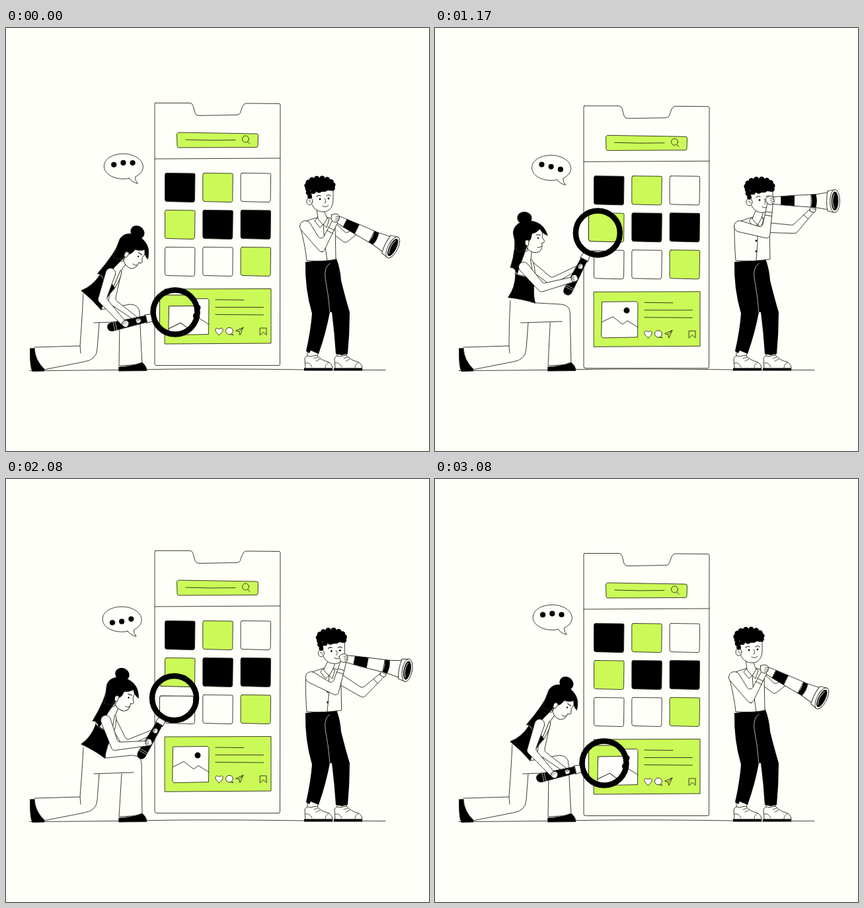
Animation, 640 px wide and 640 px high, one loop 3.16 s. Source, as an HTML page with a canvas:

```html
<!DOCTYPE html>
<html lang="en">
<head>
<meta charset="utf-8">
<title>Searching together</title>
<style>
html, body { margin: 0; width: 100%; height: 100%; overflow: hidden; background: #fffffa; }
canvas { display: block; width: 640px; height: 640px; }
</style>
</head>
<body>
<canvas id="stage" width="640" height="640"></canvas>
<script>
const ctx = document.getElementById('stage').getContext('2d');
const LOOP = 3160, FRAMES = 38, TAU = Math.PI * 2;
const PAPER = '#fffffa', INK = '#29291b', LIME = '#cbfa58', BLACK = '#000';

// ---------- helpers ----------
function paint(d, fill, line = INK, width = .9) {
  const p = new Path2D(d);
  if (fill) { ctx.fillStyle = fill; ctx.fill(p); }
  if (line) { ctx.strokeStyle = line; ctx.lineWidth = width; ctx.stroke(p); }
}

function oval(x, y, rx, ry, fill, line = INK, width = .9) {
  ctx.beginPath();
  ctx.ellipse(x, y, rx, ry, 0, 0, TAU);
  if (fill) { ctx.fillStyle = fill; ctx.fill(); }
  if (line) { ctx.strokeStyle = line; ctx.lineWidth = width; ctx.stroke(); }
}

const dot = (x, y, r) => oval(x, y, r, r, BLACK, null);
const rad = deg => deg * Math.PI / 180;
const mix = (a, b, k) => a + (b - a) * k;
const shift = (p, n, k) => [p[0] + n[0] * k, p[1] + n[1] * k];

function placed(x, y, angle, draw) {
  ctx.save();
  ctx.translate(x, y);
  ctx.rotate(angle);
  draw();
  ctx.restore();
}

// Point at local (x, y) of a frame with the given origin and angle.
function local(o, angle, x, y) {
  const c = Math.cos(angle), s = Math.sin(angle);
  return [o[0] + x * c - y * s, o[1] + x * s + y * c];
}

function normal(a, b) {
  const dx = b[0] - a[0], dy = b[1] - a[1], l = Math.hypot(dx, dy) || 1;
  return [-dy / l, dx / l];
}

// Elbow of an arm from a to c, hanging below the line between them.
function elbow(a, c, upper, fore) {
  const dx = c[0] - a[0], dy = c[1] - a[1];
  const d = Math.min(Math.hypot(dx, dy), upper + fore - 1);
  const cos = (upper * upper + d * d - fore * fore) / (2 * upper * d);
  const turn = Math.atan2(dy, dx) + Math.acos(Math.max(-1, Math.min(1, cos)));
  return local(a, turn, upper, 0);
}

// Tapered arm with a round shoulder; w is the half width at the shoulder.
function arm(a, c, upper, fore, w, cuffs = []) {
  const b = elbow(a, c, upper, fore);
  const n = normal(a, b), m = normal(b, c);
  const l = Math.max(1.1, Math.hypot(n[0] + m[0], n[1] + m[1]));
  const k = [(n[0] + m[0]) / l, (n[1] + m[1]) / l];
  const bend = w * .8 * Math.min(1.5, 2 / l), turn = Math.atan2(n[1], n[0]);
  const side = s => [shift(a, n, w * s), shift(b, k, bend * s), shift(c, m, w * s / 2)];
  const p = side(1), q = side(-1);
  ctx.beginPath();
  ctx.arc(...a, w, turn + Math.PI, turn, true);
  ctx.arcTo(...p[1], ...p[2], 5);
  ctx.lineTo(...p[2]);
  ctx.lineTo(...q[2]);
  ctx.arcTo(...q[1], ...q[0], 5);
  ctx.lineTo(...q[0]);
  ctx.fillStyle = PAPER;
  ctx.fill();
  ctx.strokeStyle = INK;
  ctx.lineWidth = .9;
  ctx.stroke();
  for (const t of cuffs) {
    const at = [mix(b[0], c[0], t), mix(b[1], c[1], t)], half = w * mix(.8, .5, t);
    paint(`M${shift(at, m, half)}L${shift(at, m, -half)}`);
  }
}

function fist(x, y, angle, r) {
  placed(x, y, angle, () => {
    ctx.scale(r, r);
    paint('M-1 -.6Q-.4 -1.2 .5 -1Q1.2 -.7 1 0Q1 .9 0 1Q-1 1 -1 -.6Z', PAPER, INK, .9 / r);
    for (const y of [-.45, 0, .45]) paint(`M.1 ${y}L.95 ${y}`, null, INK, .7 / r);
  });
}

// Keyed poses, eased between neighbours; the last one returns to the first.
function pose(keys, t) {
  let i = keys.length - 1;
  while (i > 0 && t < keys[i].at) i--;
  const a = keys[i], b = keys[i + 1] || { ...keys[0], at: LOOP };
  const u = (t - a.at) / (b.at - a.at), k = u * u * (3 - 2 * u);
  return Object.fromEntries(Object.keys(a).map(name => [name, mix(a[name], b[name], k)]));
}

const blinking = t => t > 270 && t < 400;

// ---------- phone ----------
const TILES = [BLACK, LIME, PAPER, LIME, BLACK, BLACK, PAPER, PAPER, LIME];

function tiles() {
  TILES.forEach((fill, i) => placed(240.5 + (i % 3) * 57.3, 220 + Math.floor(i / 3) * 56, 0, () =>
    paint('M2 0L43 .5Q46 0 45.5 3L45 41Q45 44 42 44L3 43Q0 43 0 40L0 3Q0 0 2 0Z', fill)));
}

function card() {
  paint('M240.5 395.5L401 395L401 477.5L240.5 478.5Z', LIME);
  paint('M253 410.5L305 410L307 412L306.5 464L254 465L252 463Z', PAPER);
  paint('M252.5 441L269 433L284 444.5L291 439L307 449');
  dot(290, 423.5, 4.5);
  paint('M317 411.5L360 412M317 423L389.5 423M317 434L389.5 434.5');
  paint('M322.5 465C313 458 317 452 322.5 456C328 452 332 458 322.5 465Z', PAPER);
  oval(338, 459, 5.5, 5.2, PAPER);
  paint('M341 463L344 465L339 464', PAPER);
  paint('M348 458.5L359 453.5L354 465L352.5 460ZM352.5 460L359 453.5');
  paint('M384.5 454.5L394 454.5L394 465L389.5 460.5L384.5 465Z');
}

function phone(dy) {
  placed(0, dy, 0, () => {
    paint(`M226 114L278 114Q282 114 283 118L286 129Q287 133 292 133L349 132Q354 132 355 127L358 119
      Q360 114.5 364 114.5L413 115Q415 115 415 117L414.5 509Q414.5 511 412 511L228 511Q225 511 225 508
      L225 116Q225 114 226 114Z`, PAPER);
    paint('M225 198.5L415 197.5');
    paint('M261 158.5L379 160.5Q382 161 381.5 163L381 179Q381 181 378 181L261 181.5Q259 181 259 179L258.5 161Z', LIME);
    paint('M272 169.5Q310 171 347 170');
    oval(362.5, 168.5, 5, 5, null);
    paint('M366 172.5L369 176');
    tiles();
    card();
  });
}

// ---------- speech bubble ----------
function bubble(t) {
  const w = TAU * 2 / LOOP, c = Math.cos(w * t);
  placed(175.8 + 1.6 * c, 212.4 - 2.1 * c, 0, () => {
    paint(`M9 17C-8 21 -29 13 -29 -1C-29 -13 -15 -20 0 -20C17 -20 30 -11 30 0
      C30 6 25 12 18 15Q18 21 22 25Q13 23 9 17Z`, PAPER);
    for (let i = 0; i < 3; i++)
      dot((i - 1) * 14.2, -1.3 + 5.4 * Math.cos(w * (t - 500 - i * 200)), 4.1);
  });
}

// ---------- woman ----------
// She leans from the waist; (x, y) is the lens centre, aim the handle's angle.
const WOMAN = [
  { at: 0, lean: 36, waist: 129, x: 256, y: 430, aim: 167 },
  { at: 400, lean: 34, waist: 129, x: 261, y: 431, aim: 170 },
  { at: 750, lean: 0, waist: 127.5, x: 253, y: 316, aim: 126 },
  { at: 1500, lean: 6.5, waist: 134, x: 241.5, y: 305.5, aim: 111 },
  { at: 1830, lean: 18, waist: 135, x: 264, y: 328, aim: 122 },
  { at: 2330, lean: 27, waist: 129, x: 245, y: 335, aim: 118 },
  { at: 2830, lean: 36, waist: 129, x: 256, y: 430, aim: 167 },
];

function glass(lens, a, dy) {
  ctx.save();
  ctx.beginPath();
  ctx.arc(...lens, 31, 0, TAU);
  ctx.fillStyle = PAPER;
  ctx.fill();
  ctx.clip();
  ctx.translate(307, 320 + dy);
  ctx.scale(1.12, 1.12);
  ctx.translate(-307, -320);
  tiles();
  card();
  ctx.restore();
  oval(...lens, 33.5, 33.5, null, BLACK, 8.5);
  placed(...lens, a, () => {
    paint('M37 -5.5L46 -6.5L46 6.5L37 5.5Z', PAPER);
    paint('M45 -5L98 -6.5Q105 -6 105 0Q105 6 98 6.5L45 5Z', BLACK);
    paint('M92 -6L92 6M95 -6L95 6', null, PAPER, .6);
  });
}

function legs(waist, hemL, hemR) {
  const hx = hemL[0] + 3, hy = hemL[1] + 4, kx = waist + 73, ky = 418;
  const back = `M${hx} ${hy}Q${hx - 2} 445 112 481`;
  const sole = 'L57 517L118 505Q137 502 138 486L141 446';
  paint(`${back}L43 483${sole}L${hemR}Z`, PAPER, null);
  paint(`${back}L113 492M112 481L43 483M57 517${sole}`);
  paint('M36.5 485L43 484.5Q44 503 58 516L58 519L40 519.5Q36 513 36.5 485Z', BLACK);
  const front = `M${hemR}L${kx - 14} ${ky}Q${kx} ${ky + 1} ${kx} ${ky + 13}L206 509L171 511L${kx - 30} 446`;
  paint(`${front}L${hx + 16} 446L${hx} ${hy}Z`, PAPER, null);
  paint(`${front}M${kx - 12} 444L${hx + 16} 446`);
  paint('M171 513Q190 512 206 506Q213 512 213 518.5L171 519Z', BLACK);
}

function womanHead(blink) {
  paint('M-10 -14L9 -18Q13 -9 12 -3L16 3Q16 6 12 6L13 11Q12 20 5 21Q-5 22 -11 14Z', PAPER);
  paint(`M-32 -6C-33 -20 -18 -28 -4 -26C10 -24 16 -16 20 -6Q12 -8 8 -15Q2 -8 -4 -7
    Q-4 2 -8 5L-12 18L-24 22Z`, BLACK);
  oval(-16.5, -30, 11, 9.5, BLACK, null);
  paint('M-8 3Q-15 2 -13 8Q-12 13 -8 11Z', PAPER);
  oval(-11, 16, 2.4, 4.5, null);
  paint('M3 -6L9 -6', null, INK, 1.2);
  if (blink) paint('M3 0Q6 2 8 0');
  else dot(6, -1, 1.2);
  paint('M6 13Q10 14 12 11');
}

function woman(t, dy) {
  const p = pose(WOMAN, t), lean = rad(p.lean), aim = rad(p.aim);
  const hips = [p.waist, 412], lens = [p.x, p.y];
  const on = (x, y) => local(hips, lean, x, y);
  const grip = d => local(lens, aim, d, 0);
  const head = on(12.5, -94.5), shoulder = on(-.5, -50.5);
  const [sx, sy] = shoulder;

  legs(p.waist, on(-20.5, -2.5), on(20.5, 2.5));
  arm(on(8, -55), grip(57), 42, 50, 6);
  placed(...hips, lean, () => {
    paint('M0 -86L-2 -68Q-9 -64 -12 -54L-12.5 -38.5L18 -35Q17 -56 10 -64L10 -75Z', PAPER);
    paint('M-12 -39Q2 -33 12 -38L18 -36Q15 -14 20.5 3Q2 -2 -21 -3Q-11 -18 -12 -39Z', BLACK);
    paint('M15 -37L9 -63');
  });
  paint(`M${local(head, lean, -31, -9)}Q${local(head, lean, -25, 15)} ${sx - 20} ${sy + 1}
    Q${sx - 13} ${sy} ${sx - 10} ${sy + 11}Q${local(head, lean, -15, 30)} ${local(head, lean, -8, 5)}Z`, BLACK);
  placed(...head, lean, () => womanHead(blinking(t)));
  glass(lens, aim, dy);
  fist(...grip(57), aim + 1.5, 3.8);
  arm(shoulder, grip(79), 42, 50, 7.5);
  fist(...grip(77), aim + 1, 5);
}

// ---------- man ----------
// step moves him forward; (x, y) is the eyepiece, hold the far hand's distance along the tube.
const MAN = [
  { at: 0, step: 0, x: 498, y: 287.5, tilt: 27, hold: 40 },
  { at: 580, step: 0, x: 498, y: 287.5, tilt: 27, hold: 40 },
  { at: 770, step: 13, x: 514, y: 275.5, tilt: 27.5, hold: 40 },
  { at: 1120, step: 16, x: 507, y: 261, tilt: .5, hold: 65 },
  { at: 1850, step: 16, x: 507, y: 261, tilt: .5, hold: 65 },
  { at: 2330, step: 19, x: 515, y: 283, tilt: 22.5, hold: 62 },
  { at: 2830, step: 0, x: 498, y: 287.5, tilt: 27, hold: 40 },
];

function shoe(x) {
  placed(x, 0, 0, () => {
    paint('M1 515L0 500Q3 494 8 497L18 495Q25 503 35 505Q42 508 42 515Z', PAPER);
    paint('M14 500L20 498M17 504L23 501M1 507Q8 505 11 513M31 514Q31 509 36 506', null, INK, .8);
    paint('M-1 514.5L42 514.5L42 518.5L-1 518.5Z', BLACK, null);
  });
}

function trousers() {
  paint('M456 484L456 499L471 497L473 488ZM501 488L501 498L515 496L516 488Z', PAPER);
  shoe(452);
  shoe(497);
  paint(`M453 354Q478 352 500 349Q506 365 507 382Q514 410 520 430Q520 462 517 493L508 495L499 493
    Q497 462 493 430L490 430Q484 462 473 493L461 488L459 492L454 489Q461 458 463 432Q452 395 453 354Z`, BLACK, null);
  paint('M490 356Q481 362 483 378Q488 404 490 430', null, '#d8d8cc', .8);
}

function manHead(blink) {
  paint('M-14 -10L-14 6C-12 15 -5 20 4 20C14 20 19 12 19 1L19 -14Z', PAPER);
  oval(-16.5, 4, 4.5, 5.5, PAPER);
  paint('M-18 3Q-15 2 -15 6', null, INK, .8);
  oval(-1, -20, 19, 10, BLACK, null);
  for (let i = 0; i < 10; i++) {
    const a = Math.PI * (.88 + i * .135);
    dot(-1 + 19.5 * Math.cos(a), -19 + 11.5 * Math.sin(a), 4.2);
  }
  for (let i = 0; i < 4; i++) dot(-11 + i * 8.5, -11 - i * 1.6, 4);
  dot(-18, -9, 4.3);
  dot(-16.5, -3, 3.4);
  paint('M-6 -3Q-3 -6 0 -4M9 -4Q12 -7 15 -4', null, INK, 1.1);
  if (blink) paint('M-4 1Q-1 3 2 1M10 1Q13 2 15 0');
  else { dot(-1, 1, 1.4); dot(12, 0, 1.4); }
  paint('M6 0Q10 6 6 7M3 11Q8 15 12 10');
}

function telescope(x, y, a) {
  placed(x, y, a, () => {
    paint('M2 -5L17 -6.5L17 6.5L2 5Z', PAPER);
    paint('M17 -6.5L37 -8L37 8L17 6.5Z', BLACK);
    paint('M37 -8L62 -9.5L62 9.5L37 8Z', PAPER);
    paint('M62 -9.5L69 -10Q72 0 69 10L62 9.5Q65 0 62 -9.5Z', BLACK);
    paint('M69 -10L88 -13L88 13L69 10Q72 0 69 -10Z', PAPER);
    paint('M87 -15L98 -17.5L98 17.5L87 15Q84 0 87 -15Z', PAPER);
    oval(98, 0, 7.5, 17.5, PAPER);
    oval(98, 0, 5, 14, BLACK);
    paint('M97 -11Q92 0 97 11', null, PAPER);
  });
}

function shirt(push, hx, hy) {
  const x = v => v + push;
  paint(`M${x(445)} 300Q${x(447)} 293 ${x(470)} 287L${x(488)} 287Q${x(498)} 289 ${x(498)} 296
    L${x(499)} 350Q480 354 455 352Q453 330 ${x(445)} 300Z`, PAPER);
  paint(`M${hx - 6} ${hy + 15}L${x(472)} 289L${x(480)} 298L${x(486)} 288L${hx + 5} ${hy + 18}`, PAPER);
  paint(`M${x(472)} 286L${x(467)} 292L${x(475)} 302L${x(480)} 297L${x(485)} 302L${x(489)} 290L${x(486)} 286`);
  paint(`M${x(480)} 297Q${x(481)} 325 486 352`);
  for (const y of [322, 338]) dot(x(478), y, 1.4);
}

function man(t) {
  const { step, x, y, tilt, hold } = pose(MAN, t);
  const a = rad(tilt), push = step * .5, hx = 476 + step, hy = 258 + step * .08;
  const far = local([x, y], a, hold, (hold - 40) * .6 - 2);
  const reach = 25 + step;
  trousers();
  arm([495 + push, 302], far, reach, reach, 7.5, [.62]);
  fist(...far, a - 1, 4.5);
  shirt(push, hx, hy);
  placed(hx, hy, 0, () => manHead(blinking(t)));
  telescope(x, y, a);
  arm([453 + push, 300], [x, y + 5], 41, 45, 8.5, [.6, .72]);
  fist(x, y, a - .3, 6.2);
}

// ---------- loop ----------
function render(now) {
  const frame = Math.floor(((now % LOOP) + 4) / LOOP * FRAMES) % FRAMES;
  const t = frame / FRAMES * LOOP;
  const dy = 5.9 * Math.sin(TAU * t / LOOP) - .5;
  ctx.lineJoin = ctx.lineCap = 'round';
  ctx.fillStyle = PAPER;
  ctx.fillRect(0, 0, 640, 640);
  paint('M36 518.5Q140 518 225 516.5T450 517L574 517.5');
  phone(dy);
  bubble(t);
  man(t);
  woman(t, dy);
}

let start = null;
function tick(now) {
  if (start === null) start = now;
  render(now - start);
  requestAnimationFrame(tick);
}
render(0);
requestAnimationFrame(tick);
</script>
</body>
</html>
```
